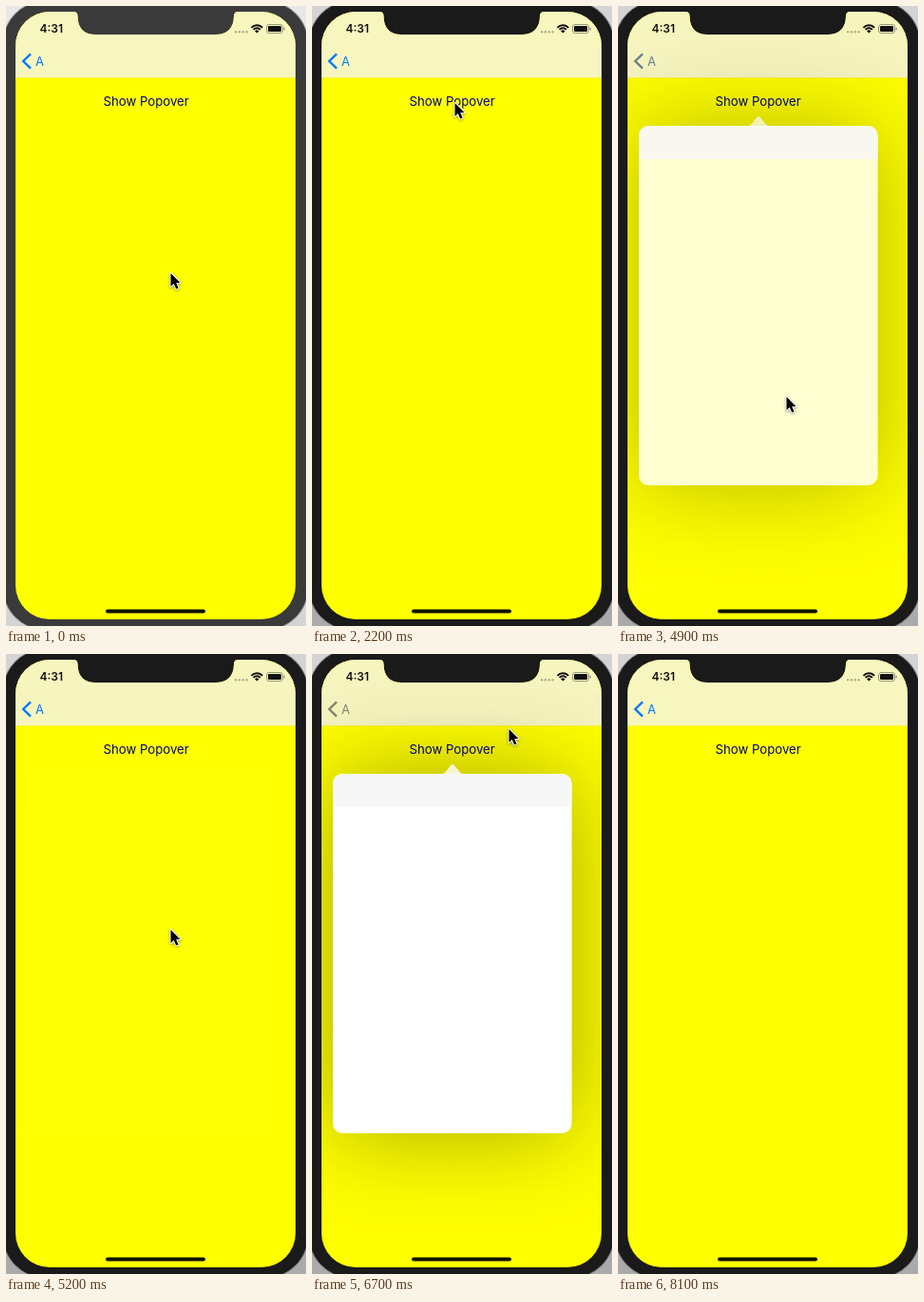
Recreate the animation shown at these times as an HTML page with a canvas. Size 316 px wide and 652 px high, loop 8.3 s.

```html
<!DOCTYPE html>
<html>
<head>
<meta charset="utf-8">
<style>
  html, body { margin: 0; width: 100%; height: 100%; overflow: hidden; background: #1a1a1a; }
  canvas { display: block; }
</style>
</head>
<body>
<canvas id="stage" width="316" height="652"></canvas>
<script>
const ctx = document.getElementById('stage').getContext('2d');
const LOOP = 8300, STEP = 100;
const FOCUS_AT = 1800, POINTER_GONE = 8000;

// time, x, y of the pointer tip
const pointerPath = [
  [0, 173, 281], [400, 32, 62], [500, 32, 62], [850, 120, 9],
  [1150, 212, 110], [1450, 168, 230], [2200, 150, 102], [2300, 150, 102],
  [3200, 250, 93], [3700, 250, 93], [4600, 197, 556], [4700, 194, 545],
  [4900, 177, 411], [5600, 168, 104], [6000, 172, 101], [6400, 186, 98],
  [7100, 240, 50], [7250, 240, 44], [7400, 239, 15], [7700, 239, 8]
];

// start, duration, opacity at the end
const fades = [
  [2330, 420, 1], [4780, 450, 0], [5690, 420, 1], [7260, 440, 0]
];

const clamp = v => Math.max(0, Math.min(1, v));
const smooth = v => v * v * (3 - 2 * v);
const mix = (a, b, k) => a + (b - a) * k;
const rgb = (a, b, k) => `rgb(${a.map((v, i) => Math.round(mix(v, b[i], k)))})`;

function pointerAt(t) {
  const i = pointerPath.findIndex(p => p[0] > t);
  if (i < 0) return pointerPath[pointerPath.length - 1].slice(1);
  const [t0, x0, y0] = pointerPath[i - 1], [t1, x1, y1] = pointerPath[i];
  const k = smooth((t - t0) / (t1 - t0));
  return [mix(x0, x1, k), mix(y0, y1, k)];
}

function popoverOpacity(t) {
  return fades.reduce((v, [start, length, end]) =>
    mix(v, end, smooth(clamp((t - start) / length))), 0);
}

function roundRect(x, y, w, h, r, color) {
  ctx.fillStyle = color;
  ctx.beginPath();
  ctx.roundRect(x, y, w, h, r);
  ctx.fill();
}

function label(text, x, y, font, color, align = 'left') {
  ctx.font = font + ' Inter, Roboto, sans-serif';
  ctx.fillStyle = color;
  ctx.textAlign = align;
  ctx.fillText(text, x, y);
}

function drawDevice(focused) {
  const desk = ctx.createLinearGradient(0, 0, 0, 652);
  desk.addColorStop(0, focused ? '#d4d4d4' : '#e8e8e8');
  desk.addColorStop(1, focused ? '#aaa' : '#d4d4d4');
  ctx.fillStyle = desk;
  ctx.fillRect(0, 0, 316, 652);
  roundRect(-4, -6, 323, 663, 46, focused ? '#858585' : '#a0a0a0');
  roundRect(-3, -5, 321, 661, 45, focused ? '#1a1a1a' : '#3a3a3a');
}

function screenPath() {
  const p = new Path2D();
  p.moveTo(46, 6);
  p.lineTo(71, 6);
  p.quadraticCurveTo(75.5, 6, 75.5, 11);
  p.bezierCurveTo(75.5, 23, 82, 30, 94, 30);
  p.lineTo(221, 30);
  p.bezierCurveTo(233, 30, 240, 23, 240, 11);
  p.quadraticCurveTo(240, 6, 244.5, 6);
  p.lineTo(269, 6);
  p.arcTo(305, 6, 305, 42, 36);
  p.arcTo(305, 645, 269, 645, 36);
  p.arcTo(10, 645, 10, 609, 36);
  p.arcTo(10, 6, 46, 6, 36);
  p.closePath();
  return p;
}

function popoverPath() {
  const p = new Path2D();
  p.roundRect(22, 126, 251.5, 378, 10);
  return p;
}

function arrowPath() {
  const p = new Path2D();
  p.moveTo(136, 126.2);
  p.quadraticCurveTo(139, 126, 141, 123.5);
  p.lineTo(146.2, 117);
  p.quadraticCurveTo(148, 115, 149.8, 117);
  p.lineTo(155, 123.5);
  p.quadraticCurveTo(157, 126, 160, 126.2);
  p.closePath();
  return p;
}

const screen = screenPath(), popover = popoverPath(), arrow = arrowPath();

function drawStatus() {
  label('4:31', 35.5, 28.3, '600 12px', '#111');
  for (let i = 0; i < 4; i++) roundRect(241 + i * 3.8, 26, 2.4, 2.4, 1.2, '#b0ae8c');

  ctx.strokeStyle = '#111';
  ctx.lineWidth = 1.9;
  for (const r of [5, 8]) {
    ctx.beginPath();
    ctx.arc(264.3, 28.3, r, -Math.PI * 0.76, -Math.PI * 0.24);
    ctx.stroke();
  }
  ctx.fillStyle = '#111';
  ctx.beginPath();
  ctx.moveTo(264.3, 28.5);
  ctx.arc(264.3, 28.5, 3, -Math.PI * 0.76, -Math.PI * 0.24);
  ctx.fill();

  ctx.strokeStyle = '#99977c';
  ctx.lineWidth = 1;
  ctx.beginPath();
  ctx.roundRect(274.5, 19.5, 17, 9, 2.5);
  ctx.stroke();
  roundRect(276, 21, 14, 6, 1.2, '#111');
  roundRect(292.5, 22.5, 1.3, 3, 0.6, '#99977c');
}

function drawPage(opacity) {
  ctx.fillStyle = '#ff0';
  ctx.fillRect(0, 0, 316, 652);
  ctx.fillStyle = '#f8f6bf';
  ctx.fillRect(0, 0, 316, 75);
  ctx.fillStyle = '#eeea8a';
  ctx.fillRect(0, 75, 316, 0.5);

  const tint = rgb([0, 122, 255], [132, 132, 118], opacity);
  ctx.strokeStyle = tint;
  ctx.lineWidth = 2.4;
  ctx.beginPath();
  ctx.moveTo(26, 50.3);
  ctx.lineTo(18.2, 58);
  ctx.lineTo(26, 65.7);
  ctx.stroke();
  label('A', 31, 62.7, '13px', tint);
  label('Show Popover', 147.6, 105.3, '13.2px', '#00008a', 'center');
}

function drawPopover(opacity) {
  if (!opacity) return;
  ctx.save();
  ctx.globalAlpha = opacity;

  // The shadow falls only outside the panel.
  ctx.save();
  const outside = new Path2D();
  outside.rect(0, 0, 316, 652);
  outside.addPath(popover);
  ctx.clip(outside, 'evenodd');
  ctx.shadowColor = 'rgba(0,0,0,0.34)';
  ctx.shadowBlur = 100;
  ctx.shadowOffsetX = 1000;
  ctx.translate(-1000, 0);
  ctx.fillStyle = '#000';
  ctx.fill(popover);
  ctx.restore();

  ctx.fillStyle = '#f6f6d2';
  ctx.fill(arrow);
  ctx.clip(popover);
  ctx.fillStyle = '#fff';
  ctx.fillRect(22, 126, 252, 378);
  ctx.fillStyle = '#f7f7f7';
  ctx.fillRect(22, 126, 252, 35);
  ctx.restore();
}

function drawPointer(x, y) {
  ctx.save();
  ctx.translate(Math.round(x) + 0.5, Math.round(y));
  ctx.beginPath();
  ctx.moveTo(0, 0);
  ctx.lineTo(0, 14);
  ctx.lineTo(3.2, 11);
  ctx.lineTo(5.7, 16.5);
  ctx.lineTo(8.1, 15.4);
  ctx.lineTo(5.7, 10.2);
  ctx.lineTo(10, 10);
  ctx.closePath();
  ctx.lineJoin = 'round';
  ctx.lineWidth = 2;
  ctx.strokeStyle = '#fff';
  ctx.shadowColor = 'rgba(0,0,0,0.4)';
  ctx.shadowBlur = 3;
  ctx.shadowOffsetY = 1;
  ctx.stroke();
  ctx.shadowColor = 'transparent';
  ctx.fillStyle = '#000';
  ctx.fill();
  ctx.restore();
}

function draw(t) {
  const opacity = popoverOpacity(t);
  drawDevice(t >= FOCUS_AT);
  ctx.save();
  ctx.clip(screen);
  drawPage(opacity);
  drawPopover(opacity);
  drawStatus();
  roundRect(105, 634.5, 105, 4, 2, '#111100');
  ctx.restore();
  if (t < POINTER_GONE) drawPointer(...pointerAt(t));
}

const start = performance.now();
function frame() {
  const t = (performance.now() - start) % LOOP;
  draw(Math.floor(t / STEP) * STEP);
  requestAnimationFrame(frame);
}
frame();
</script>
</body>
</html>
```
